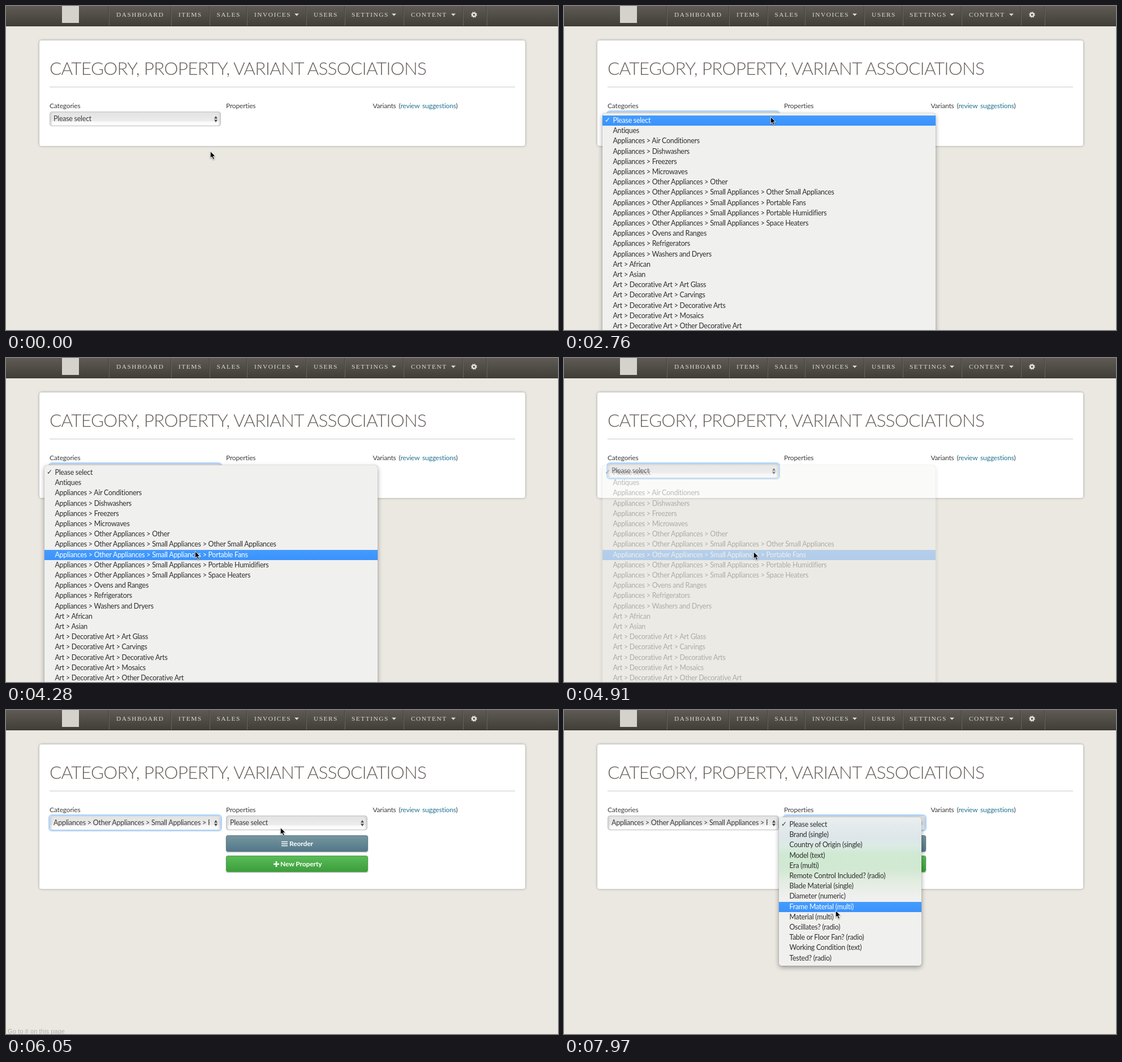
An HTML page for the animation above (8 s loop, 976 by 574 pixels).

```html
<!DOCTYPE html>
<html lang="en">
<head>
<meta charset="utf-8">
<title>Category associations</title>
<style>
  html, body { margin: 0; width: 100%; height: 100%; overflow: hidden; background: #ebe8e1; }
  body { position: relative; font: 12px Lato, "Open Sans", sans-serif; color: #3d3d3d; }
  body * { position: absolute; box-sizing: border-box; white-space: nowrap; }

  nav { left: 0; top: 0; width: 100%; height: 36px; background: linear-gradient(#5f5b54, #413d38); border-bottom: 1px solid #3a3632; }
  nav span { top: 5px; font: 11.4px/20px "Liberation Serif", serif; letter-spacing: 1.5px; color: #dedbd3; }
  nav i { top: 0; width: 2px; height: 35px; background: linear-gradient(90deg, #46423d 50%, #68645d 50%); }
  nav svg { left: 0; top: 0; }
  .logo { left: 99px; top: 0; width: 30px; height: 30px; background: #d4d2cb; }

  #panel { left: 59px; top: 61px; width: 859px; height: 187px; background: #fff; border-radius: 4px; box-shadow: 0 0 4px rgba(0,0,0,.33); }
  h1 { left: 77px; top: 90px; margin: 0; font-size: 31.6px; font-weight: 300; line-height: 40px; letter-spacing: -.77px; color: #675e59; }
  hr { left: 77px; top: 143px; width: 823px; height: 1px; margin: 0; border: 0; background: #cbcac8; }
  label { top: 167px; line-height: 20px; letter-spacing: -.18px; word-spacing: 2px; }
  label a { position: static; color: #1f7491; }

  .sel { top: 187px; height: 26px; border: 1px solid #c2c2c2; border-radius: 4px; font-size: 12.5px; letter-spacing: -.26px;
    background: linear-gradient(#e3e3e3, #ececec 66%, #f9f9f9 70%, #fff); box-shadow: inset 3px 0 3px -1px #d2d2d2, inset -3px 0 3px -1px #d2d2d2; }
  .sel.focus { border-color: #bcd9f4; outline: 2px solid #b0d4f7; }
  .sel span { left: 6px; right: 19px; line-height: 24px; overflow: hidden; }
  .sel svg { right: 5px; top: 7px; }

  .btn { left: 389px; width: 251px; height: 29px; border-radius: 3px; font-weight: 700; font-size: 12px; letter-spacing: -.1px; line-height: 27px; color: #fff; box-shadow: 0 1px 2px rgba(0,0,0,.35); }
  .btn svg { top: 9px; }
  #reorder { top: 222px; background: linear-gradient(#76969f, #53788a); border: 1px solid #567784; }
  #create { top: 258px; background: linear-gradient(#5abb59, #3c9e3b); border: 1px solid #45a044; }

  .menu { top: 190px; border-radius: 5px; background: #f0f0ef; box-shadow: 0 0 1px rgba(0,0,0,.5), 0 3px 9px rgba(0,0,0,.36); }
  .menu div { left: 0; width: 100%; height: 18px; padding-left: 18.5px; font-size: 12.4px; line-height: 17px; letter-spacing: -.25px; color: #2e2e2e; }
  .menu div.on { background: linear-gradient(#449cff, #3a92fc); color: #fff; }
  .menu b { left: 4px; font: 12px/17px "DejaVu Sans", sans-serif; }
  #catMenu { left: 68px; width: 589px; height: 420px; }
  #propMenu { left: 380px; width: 252px; height: 263px;
    background: linear-gradient(#eaeeef, #dde6e9 14%, #dcebe5 19%, #d0e9d2 25%, #d1e8d2 35%, #e1ecdf 42%, #f0f0ef 54%); }

  #status { left: 3px; top: 561px; font: 11px/16px "Liberation Sans", sans-serif; letter-spacing: .1px; color: #77756f; }
  #cursor { left: 0; top: 0; overflow: visible; filter: drop-shadow(0 1px 1px rgba(0,0,0,.35)); }
</style>
</head>
<body>
<nav id="nav"><div class="logo"></div></nav>
<div id="panel"></div>
<h1>CATEGORY, PROPERTY, VARIANT ASSOCIATIONS</h1>
<hr>
<label style="left:77px">Categories</label>
<label style="left:389px">Properties</label>
<label style="left:648.5px">Variants (<a>review suggestions</a>)</label>

<div class="sel" id="cat" style="left:77px;width:303px"><span>Please select</span></div>
<div id="props">
  <div class="sel" id="prop" style="left:389px;width:250px"><span>Please select</span></div>
  <div class="btn" id="reorder">
    <svg style="left:97px" width="11" height="10"><path d="M0 1.5H11M0 5H11M0 8.5H11" stroke="#fff" stroke-width="1.6"/></svg>
    <span style="left:111px">Reorder</span>
  </div>
  <div class="btn" id="create">
    <svg style="left:83px" width="10" height="10"><path d="M0 5H10M5 0V10" stroke="#fff" stroke-width="2.6"/></svg>
    <span style="left:95px">New Property</span>
  </div>
</div>
<div id="status">Go to # on this page</div>
<div class="menu" id="catMenu"></div>
<div class="menu" id="propMenu"></div>
<svg id="cursor" width="12" height="17"><path d="M.3 .5V12.6L3.1 10L5.3 15L7.5 14L5.3 9.2H9.2Z" fill="#000" stroke="#fff" stroke-width=".9"/></svg>

<script>
const $ = id => document.getElementById(id);
const LOOP = 8000, ROW = 18.2, ROW_TOP = 194;

// Navigation bar
const links = [['DASHBOARD', 195], ['ITEMS', 305], ['SALES', 372.5], ['INVOICES', 439, 514],
  ['USERS', 544], ['SETTINGS', 611, 686], ['CONTENT', 716, 791]];
let icons = `<g fill="none" stroke="#e6e3dc"><circle cx="827.5" cy="15.5" r="2.9" stroke-width="2.3"/>
  <circle cx="827.5" cy="15.5" r="4.5" stroke-width="1.7" stroke-dasharray="1.767"/></g>`;
let bar = [181, 291, 359, 425, 530, 598, 702, 807, 849].map(x => `<i style="left:${x}px"></i>`).join('');
for (const [text, x, caret] of links) {
  bar += `<span style="left:${x}px">${text}</span>`;
  if (caret) icons += `<path d="M${caret - 4} 13.5h8l-4 4z" fill="#e6e3dc"/>`;
}
$('nav').insertAdjacentHTML('beforeend', `${bar}<svg width="900" height="35">${icons}</svg>`);

for (const sel of document.querySelectorAll('.sel'))
  sel.insertAdjacentHTML('beforeend', '<svg width="6" height="11"><path d="M0 4.5L3 0L6 4.5ZM0 6.5L3 11L6 6.5Z" fill="#4a4a4a"/></svg>');

// Menus
const app = 'Appliances > ', other = app + 'Other Appliances > ', small = other + 'Small Appliances > ';
const art = 'Art > ', deco = art + 'Decorative Art > ';
const group = (prefix, names) => names.split(',').map(n => prefix + n);
const catItems = ['Please select', 'Antiques',
  ...group(app, 'Air Conditioners,Dishwashers,Freezers,Microwaves'),
  other + 'Other',
  ...group(small, 'Other Small Appliances,Portable Fans,Portable Humidifiers,Space Heaters'),
  ...group(app, 'Ovens and Ranges,Refrigerators,Washers and Dryers'),
  ...group(art, 'African,Asian'),
  ...group(deco, 'Art Glass,Carvings,Decorative Arts,Mosaics,Other Decorative Art')];
const propItems = ['Please select', 'Brand (single)', 'Country of Origin (single)', 'Model (text)', 'Era (multi)',
  'Remote Control Included? (radio)', 'Blade Material (single)', 'Diameter (numeric)', 'Frame Material (multi)',
  'Material (multi)', 'Oscillates? (radio)', 'Table or Floor Fan? (radio)', 'Working Condition (text)', 'Tested? (radio)'];

function fillMenu(menu, items) {
  return items.map((text, i) => {
    const row = document.createElement('div');
    row.textContent = text;
    row.style.top = 4 + Math.round(i * ROW) + 'px';
    if (!i) row.insertAdjacentHTML('beforeend', '<b>✓</b>');
    menu.append(row);
    return row;
  });
}
const catRows = fillMenu($('catMenu'), catItems);
const propRows = fillMenu($('propMenu'), propItems);

// Pointer moves: first step, last step, step count, way points
const moves = [
  [890, 1580, 9, [[361, 257], [366, 276], [380, 278], [387, 262], [383, 230]]],
  [1700, 2230, 7, [[383, 230], [372, 205], [363, 199], [365, 196]]],
  [3480, 4280, 9, [[365, 196], [348, 262], [336.5, 334], [334, 341], [334, 342]]],
  [4370, 4370, 1, [[334, 342], [335, 343]]],
  [5170, 5960, 8, [[335, 343], [400, 310], [455, 262], [482, 232], [486, 214]]],
  [6050, 6250, 3, [[486, 214], [485, 208], [488, 204], [490, 203]]],
  [6990, 7200, 3, [[490, 203], [490, 224], [490, 252], [490, 263]]],
  [7380, 7970, 7, [[490, 263], [488, 300], [484, 335], [481, 351], [480, 355]]]
];

function pointer(t) {
  const move = moves.filter(m => m[0] <= t).pop();
  if (!move) return moves[0][3][0];
  const [start, end, count, pts] = move;
  const step = t >= end ? count : 1 + Math.floor((t - start) / (end - start) * (count - 1));
  const pos = step / count * (pts.length - 1);
  const i = Math.min(Math.floor(pos), pts.length - 2), f = pos - i;
  return pts[i].map((v, axis) => v + (pts[i + 1][axis] - v) * f);
}

const rowAt = y => Math.floor((y - ROW_TOP) / ROW);
const highlight = (rows, n) => rows.forEach((row, i) => row.classList.toggle('on', i === n));
const show = (el, on) => { el.style.visibility = on ? 'visible' : 'hidden'; };

function draw(t) {
  const [x, y] = pointer(t);
  $('cursor').style.transform = `translate(${x}px, ${y}px)`;

  const catOpen = t >= 2670 && t < 5020, propOpen = t >= 6400, loaded = t >= 5400;
  show($('catMenu'), catOpen);
  $('catMenu').style.opacity = t < 4820 ? 1 : t < 4910 ? .7 : .32;
  highlight(catRows, rowAt(y));
  show($('propMenu'), propOpen);
  highlight(propRows, rowAt(pointer(t - 95)[1]));

  $('cat').classList.toggle('focus', t >= 2670 && !propOpen);
  $('prop').classList.toggle('focus', propOpen);
  $('cat').firstChild.textContent = t < 5020 ? catItems[0] : catItems[8];

  show($('props'), loaded);
  $('panel').style.height = (loaded ? 256 : 187) + 'px';
  show($('status'), t >= 5750 && t < 6250);
  $('status').style.opacity = t < 6050 ? 1 : t < 6150 ? .5 : .2;
}

function tick() {
  draw(performance.now() % LOOP);
  requestAnimationFrame(tick);
}
tick();
</script>
</body>
</html>
```
